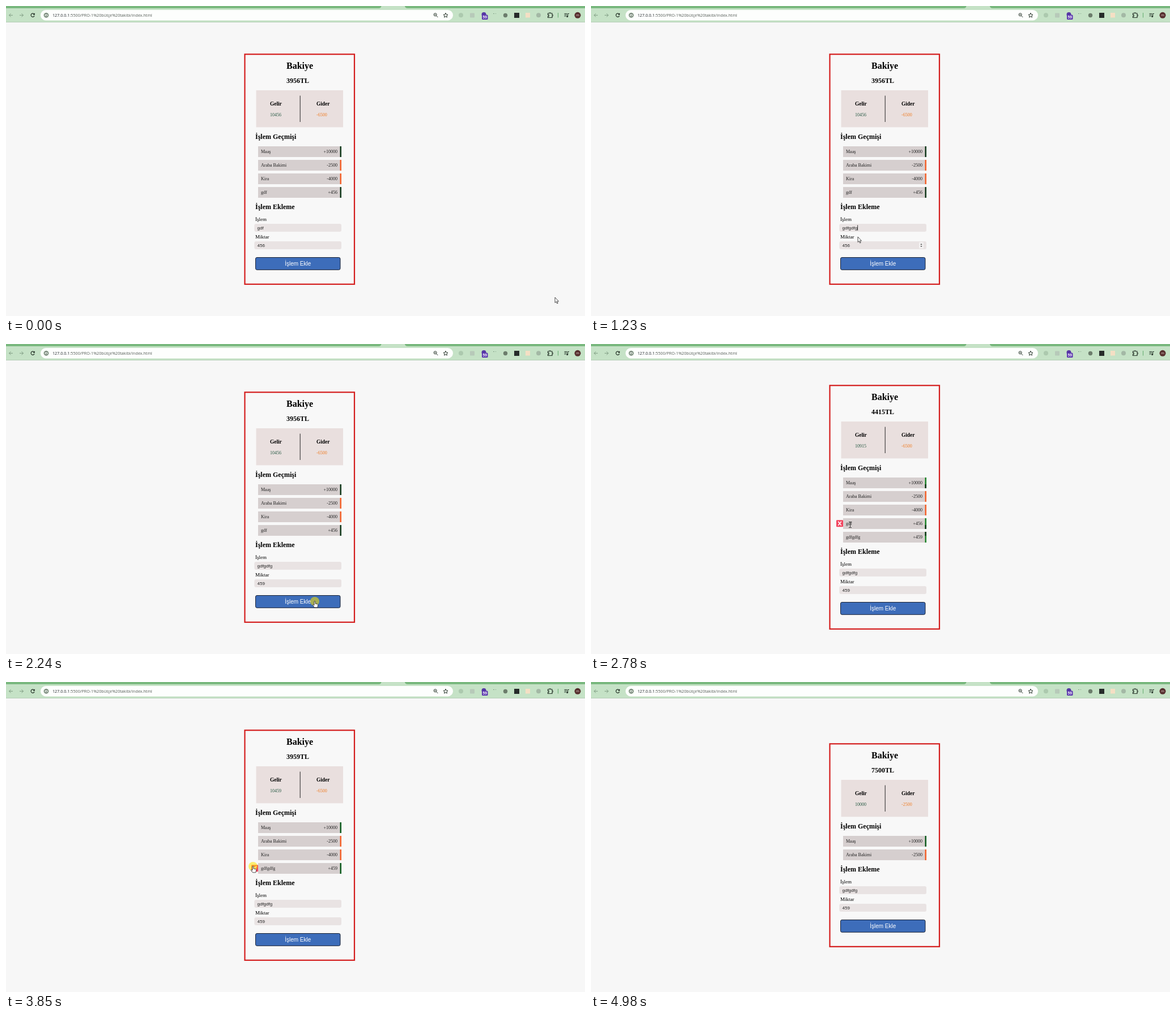
Animation, 1022 px wide and 548 px high, one loop 5.21 s. Source, as an HTML page:

```html
<!DOCTYPE html>
<html lang="tr">
<head>
<meta charset="utf-8">
<title>Bütçe takibi</title>
<style>
html, body { margin: 0; width: 100%; height: 100%; overflow: hidden; background: #f7f7f7; }
svg { display: block; }
text { white-space: pre; }
.serif { font-family: "Liberation Serif", "Times New Roman", serif; }
.sans { font-family: "Liberation Sans", Arial, sans-serif; }
.ui { font-family: "Open Sans", "Noto Sans", sans-serif; }
.b { font-weight: 700; }
.line { fill: none; stroke: #27352a; stroke-width: 1; }
</style>
</head>
<body>
<svg id="stage" width="1022" height="548" viewBox="0 0 1022 548">
  <rect width="1022" height="548" fill="#f7f7f7"/>
  <g id="bar">
    <rect width="1022" height="29" fill="#c5e2c6"/>
    <rect width="1022" height="4" fill="#79b87e"/>
    <path d="M658 4Q662 4 662.500 0H704Q704.500 4 709 4Z" fill="#c5e2c6"/>
    <rect y="28" width="1022" height="1" fill="#b5cfb7"/>
    <rect x="61" y="7" width="728" height="18.500" rx="9.250" fill="#fdfefd"/>
    <path class="line" style="stroke:#7f9c83" d="M12 16.300H5.500M8.500 13.300L5.500 16.300L8.500 19.300M24 16.300H30.500M27.500 13.300L30.500 16.300L27.500 19.300"/>
    <path class="line" style="stroke-width:1.200" d="M49.800 14.500A3.100 3.100 0 1 0 50.100 17.200M50.300 12.800V15.200H47.900"/>
    <circle cx="71" cy="16.300" r="5.600" fill="#e4efe4"/>
    <circle class="line" cx="71" cy="16.300" r="3.400"/>
    <path class="line" d="M71 15.800V18.300M71 14.200V15.100"/>
    <text class="ui" x="82" y="19" font-size="7.190" fill="#565d58"><tspan fill="#20262b">127.0.0.1</tspan>:5500/PRO-1%20bütçe%20takibi/index.html</text>
    <circle class="line" cx="757.700" cy="15.300" r="2.500"/>
    <path class="line" d="M759.500 17.200L762.300 20M756.500 15.300H759"/>
    <path class="line" stroke-linejoin="round" d="M776 12.300L777.200 15L780 15.300L777.900 17.200L778.500 20L776 18.500L773.500 20L774.100 17.200L772 15.300L774.800 15Z"/>
    <circle cx="803" cy="16.300" r="4" fill="#acc9ae"/>
    <rect x="819" y="12.500" width="8" height="8" rx="1" fill="#b7c9b9"/>
    <circle cx="843.500" cy="15" r="4" fill="#5637a4"/>
    <rect x="840" y="15.500" width="10.500" height="8.500" rx="1.500" fill="#5a35ae"/>
    <text class="sans b" x="845.200" y="22.300" font-size="6.500" fill="#fff" text-anchor="middle">59</text>
    <path d="M860 13.500h2M864 13.500h1" stroke="#82a087" fill="none"/>
    <circle cx="881.500" cy="16.500" r="3.700" fill="#6c7d6c"/>
    <rect x="897" y="12" width="9" height="9" fill="#262b2a"/>
    <rect x="917" y="12" width="8" height="8.500" fill="#f5dfc4"/>
    <circle cx="940" cy="16.300" r="4" fill="#a3b8a5"/>
    <path class="line" style="stroke-width:1.200" d="M956.500 13H959V12H961.300V13H964V15.500H965V17.600H964V20.500H956.500V18.300H958V15.600H956.500Z"/>
    <path d="M974.500 12V20.500" stroke="#64ad6e" fill="none"/>
    <path class="line" d="M985.500 13.500H990.500M985.500 15.700H990.500M985.500 18H988.500M991.700 18.500V13.500H994"/>
    <circle cx="990.700" cy="18.500" r="1.500" fill="#27352a"/>
    <circle cx="1009" cy="16.300" r="5.500" fill="#57302f"/>
    <text class="ui" x="1009" y="18.300" font-size="6" fill="#ecdcd9" text-anchor="middle">m</text>
  </g>
  <rect id="card" x="421.500" width="193.500" fill="#f8f8f8" stroke="#d41c1c" stroke-width="2.200"/>
  <g id="head">
    <text class="serif b" x="495" y="111" font-size="16">Bakiye</text>
    <text id="balance" class="serif b" x="495" y="135.500" font-size="12"></text>
    <rect x="441.500" y="149" width="153.500" height="65.300" fill="#e9dfde"/>
    <path d="M519.200 158.500V205" stroke="#222" fill="none"/>
    <text class="serif b" x="466" y="176" font-size="9.360">Gelir</text>
    <text class="serif b" x="548" y="176" font-size="9.360">Gider</text>
    <text id="income" class="serif" x="466" y="195" font-size="8" fill="#285b45"></text>
    <text id="expense" class="serif" x="548" y="195" font-size="8" fill="#ef7d25"></text>
    <text class="serif b" x="440" y="234.500" font-size="12">İşlem Geçmişi</text>
  </g>
  <g id="rows"></g>
  <g id="form">
    <text class="serif b" x="440" y="358.500" font-size="12">İşlem Ekleme</text>
    <text class="serif" x="440" y="379.500" font-size="9">İşlem</text>
    <text class="serif" x="440" y="411" font-size="9">Miktar</text>
    <rect x="438.300" y="385" width="153.700" height="14" rx="3" fill="#e9e3e3"/>
    <rect x="438.300" y="416" width="153.700" height="14" rx="3" fill="#e9e3e3"/>
    <text id="name" class="sans" x="443.500" y="395" font-size="8" fill="#222"></text>
    <text id="amount" class="sans" x="443.500" y="425.500" font-size="8" fill="#222"></text>
    <rect id="caret" width="0.900" height="9.500" fill="#222"/>
    <g id="spin">
      <rect x="579" y="417.500" width="8" height="11" fill="#f3f1f1"/>
      <path d="M581.300 422L583 420L584.700 422ZM581.300 424L583 426L584.700 424Z" fill="#444"/>
    </g>
    <rect x="440.500" y="444.500" width="149.500" height="21.800" rx="2.500" fill="#3d6dba" stroke="#1a2233"/>
    <text class="sans" x="515.200" y="458.500" font-size="10" fill="#fff" text-anchor="middle">İşlem Ekle</text>
  </g>
  <g id="remove">
    <rect x="433" y="0" width="12" height="12" rx="1" fill="#f2455f"/>
    <path d="M436.200 2.500L441.800 9.500M441.800 2.500L436.200 9.500" stroke="#fff" stroke-width="1.600" fill="none"/>
  </g>
  <circle id="glow" r="8" fill="#ffe600" opacity="0.550"/>
  <g id="cursor">
    <path id="arrow" d="M0 0V9.500L2.200 7.600L3.700 11L5.200 10.300L3.700 7.100H6.500Z" fill="#fff" stroke="#222" stroke-width="0.800"/>
    <path id="beam" d="M-2.500 -5.500H-0.500L0 -5L0.500 -5.500H2.500M0 -5V4M-2.500 4.500H-0.500L0 4L0.500 4.500H2.500" fill="none" stroke="#222" stroke-width="0.900"/>
    <path id="hand" d="M-1 0Q0 -1.200 1 0V4L4.500 4.700Q5.800 5.200 5.600 7L4.800 10.800H-0.500L-3.600 6.600Q-3.500 5.300 -2.300 5.900L-1 7Z" fill="#fff" stroke="#222" stroke-width="0.800"/>
  </g>
</svg>
<script>
const LOOP = 5210;
const $ = id => document.getElementById(id);
const show = (id, on) => $(id).setAttribute('visibility', on ? 'visible' : 'hidden');
const move = (id, x, y) => $(id).setAttribute('transform', `translate(${x} ${y})`);

const base = [['Maaş', 10000], ['Araba Bakimi', -2500], ['Kira', -4000]];
const first = ['gdf', 456], second = ['gdfgdfg', 459];
// start time, entries, colour of income bars
const lists = [
  [0, [...base, first], '#123a1c'],
  [2250, [...base, first, second], '#1c8428'],
  [3500, [...base, second], '#0e5c1f'],
  [3880, base, '#0e5c1f'],
  [4330, base.slice(0, 2), '#0e5c1f']
];

// time, x, y, shape from then on
const path = [
  [0, 969, 515, 'arrow'], [30, 969, 515, 'arrow'], [350, 460, 258, 'beam'],
  [540, 471, 394, 'beam'], [880, 471, 394, 'beam'], [1180, 471, 408, 'arrow'],
  [1240, 471, 408, 'arrow'], [1330, 475, 431, 'beam'], [1420, 475, 431, 'arrow'],
  [1620, 625, 429, 'arrow'], [1780, 583, 421, 'arrow'], [2000, 583, 421, 'arrow'],
  [2190, 545, 455, 'hand'], [2280, 545, 455, 'hand'], [2470, 574, 427, 'arrow'],
  [2550, 574, 427, 'arrow'], [2760, 457.5, 320, 'beam'], [2800, 457.5, 320, 'beam'],
  [2920, 447, 294, 'beam'], [3060, 435, 316, 'hand'], [3500, 435, 316, 'hand'],
  [3590, 436, 326, 'hand'], [3890, 436, 326, 'hand'], [4090, 436, 317, 'arrow'],
  [4340, 436, 317, 'arrow'], [4680, 990, 460, 'arrow'], [4710, 990, 460, 'arrow'],
  [4970, 990, 552, 'arrow'], [LOOP, 990, 552, 'arrow']
];
const clicks = [[620, 730], [1790, 1930], [2200, 2300], [3400, 3510], [3780, 3890], [4190, 4340]];

const typed = [[0, 'gdf'], [960, 'gdfg'], [1040, 'gdfgd'], [1120, 'gdfgdf'], [1200, 'gdfgdfg']];
const values = [[0, '456'], [1800, '457'], [1860, '458'], [1920, '459']];
const focus = [[0, ''], [620, 'name'], [1790, 'amount'], [2210, '']];

const at = (table, t) => table.findLast(step => step[0] <= t);

function pointer(t) {
  const i = path.findLastIndex(p => p[0] <= t);
  const a = path[i], b = path[i + 1];
  const k = (t - a[0]) / (b[0] - a[0]);
  const s = k * k * (3 - 2 * k);
  return { x: a[1] + (b[1] - a[1]) * s, y: a[2] + (b[2] - a[2]) * s, shape: a[3] };
}

const rect = (x, y, w, h, fill) => `<rect x="${x}" y="${y}" width="${w}" height="${h}" fill="${fill}"/>`;

function rowMarkup([label, sum], y, color, many) {
  const bar = sum < 0 ? '#f4622a' : color;
  let out = rect(445, y, 145, 19, '#d6cfcf') + rect(589.5, y, 2.5, 19, bar);
  if (many && sum > 0) {
    // darker part of the bars in the long list
    for (const top of [248, 320]) {
      const from = Math.max(y, top), to = Math.min(y, top) + 19;
      if (to > from) out += rect(589.5, from, 2.5, to - from, '#123a1c');
    }
  }
  const text = (x, anchor, s) =>
    `<text class="serif" x="${x}" y="${y + 12}" font-size="8" fill="#222" text-anchor="${anchor}">${s}</text>`;
  return out + text(450, 'start', label) + text(585, 'end', (sum > 0 ? '+' : '') + sum);
}

let current;
function drawList(list) {
  if (list === current) return;
  current = list;
  const [, items, color] = list, n = items.length, shift = 12 * (n - 4);
  const total = sign => items.reduce((s, [, v]) => s + (v * sign > 0 ? v : 0), 0);
  $('income').textContent = total(1);
  $('expense').textContent = total(-1);
  $('balance').textContent = total(1) + total(-1) + 'TL';
  $('card').setAttribute('y', 85.3 - shift);
  $('card').setAttribute('height', 406.5 + 2 * shift);
  move('head', 0, -shift);
  move('form', 0, shift);
  $('rows').innerHTML = items.map((item, i) => rowMarkup(item, 248 - shift + 24 * i, color, n > 4)).join('');
}

function frame() {
  const t = performance.now() % LOOP;
  const list = at(lists, t), n = list[1].length, shift = 12 * (n - 4);
  drawList(list);
  $('name').textContent = at(typed, t)[1];
  $('amount').textContent = at(values, t)[1];

  const field = at(focus, t)[1];
  show('caret', field);
  if (field) {
    $('caret').setAttribute('x', 443.5 + $(field).getComputedTextLength());
    $('caret').setAttribute('y', field === 'name' ? 387.3 : 418.2);
  }

  const { x, y, shape } = pointer(t);
  move('cursor', x, y);
  for (const s of ['arrow', 'beam', 'hand']) show(s, s === shape);
  move('glow', x, y);
  show('glow', clicks.some(([a, b]) => t >= a && t < b));

  const inside = x > 432 && x < 592;
  const row = Math.floor((y - 248 + shift) / 24), top = 248 - shift + 24 * row;
  show('remove', inside && row >= 0 && row < n && y < top + 19);
  move('remove', 0, top + 3.3);
  show('spin', inside && y - shift > 403 && y - shift < 432);
  requestAnimationFrame(frame);
}
frame();
</script>
</body>
</html>
```
